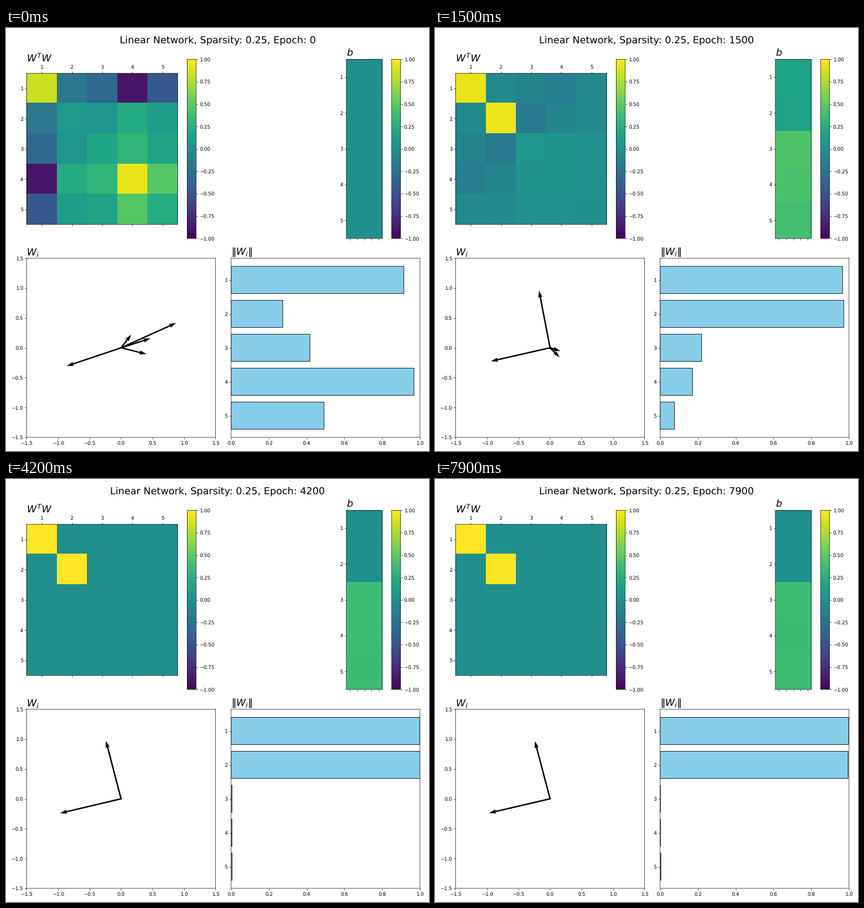
These frames come from a looping animation (748x748 px, 8000 ms). A matplotlib script:

```python
import numpy as np
import matplotlib.pyplot as plt
from matplotlib.animation import FuncAnimation

plt.rcParams.update({"path.snap": False, "text.hinting": "no_hinting"})

SIZE = 748
FRAMES, INTERVAL = 80, 100
FEATURES = np.arange(1, 6)
MEAN_X = 0.375  # expected value of one sparse input
MID, SETTLE = 7, 15  # in frames of 100 epochs
DECAY = 0.16

# Five weight vectors as complex numbers: three poses of the search phase
POSES = np.array([
    [-.862 - .306j, .162 + .221j, .404 - .106j, .874 + .416j, .466 + .157j],
    [-.847 - .146j, -.189 + .825j, .098 - .434j, .456 + .190j, .126 - .035j],
    [-.940 - .225j, -.175 + .957j, .152 - .159j, .163 - .054j, .070 - .030j],
])
# In the end two features stay, at right angles, and the rest vanish
FIRST = np.exp(-2.901j)
REST = np.array([FIRST, -1j * FIRST, 0, 0, 0])


def search(t):
    """Parabola through the three poses."""
    a, b, c = POSES
    s1 = (b - a) / MID
    s2 = (c - b) / (SETTLE - MID)
    return a + s1 * t + (s2 - s1) / SETTLE * t * (t - MID)


def converge(t):
    """Exponential approach to the final pose, with training noise."""
    rng = np.random.default_rng(t)
    noise = rng.normal(0, 0.003, 5) + 1j * rng.normal(0, 0.003, 5)
    return REST + (POSES[-1] - REST) * np.exp(-DECAY * (t - SETTLE)) + noise


def weights(t):
    return search(t) if t <= SETTLE else converge(t)


def bias(gram, epoch):
    """Best bias for the weights, reached at the optimiser's step limit."""
    limit = epoch * 0.001
    return np.clip(MEAN_X * (1 - gram.sum(axis=1)), -limit, limit)


fig = plt.figure(figsize=(12, 12), dpi=SIZE / 12)


def panel(x, y, w, h):
    """Axes from a box in pixels with the origin at the top left."""
    return fig.add_axes([x / SIZE, 1 - (y + h) / SIZE, w / SIZE, h / SIZE])


def heatmap(ax, data):
    im = ax.imshow(data, cmap="viridis", vmin=-1, vmax=1, aspect="auto")
    ax.set_yticks(range(5), FEATURES)
    return im


def heading(ax, text):
    ax.set_title(text, loc="left", fontsize=20)


LEFT, RIGHT, TOP, LOW = 36.45, 398, 55.3, 407.1
WIDTH, HEIGHT = 334, 316.8
MAP = 0.8 * WIDTH  # what the colour scale leaves of a cell
STRIP = HEIGHT / 5

title = fig.suptitle("", fontsize=20)

gram_ax = panel(LEFT, TOP + (HEIGHT - MAP) / 2, MAP, MAP)
gram_im = heatmap(gram_ax, np.zeros((5, 5)))
gram_ax.set_xticks(range(5), FEATURES)
gram_ax.tick_params(axis="x", top=True, bottom=True,
                    labeltop=True, labelbottom=False)
heading(gram_ax, "$W^TW$")

bias_ax = panel(RIGHT + MAP - STRIP, TOP, STRIP, HEIGHT)
bias_im = heatmap(bias_ax, np.zeros((5, 1)))
bias_ax.set_xticks(np.linspace(-0.4, 0.4, 5), [""] * 5)
heading(bias_ax, "$b$")

for im, x in ((gram_im, LEFT), (bias_im, RIGHT)):
    cax = panel(x + 0.85 * WIDTH, TOP, HEIGHT / 20, HEIGHT)
    fig.colorbar(im, cax=cax, ticks=np.arange(-1, 1.01, 0.25))

vec_ax = panel(LEFT, LOW, WIDTH, HEIGHT)
vec_ax.set(xlim=(-1.5, 1.5), ylim=(-1.5, 1.5))
arrows = vec_ax.quiver(np.zeros(5), np.zeros(5), POSES[0].real, POSES[0].imag,
                       color="black", angles="xy", scale_units="xy", scale=1)
heading(vec_ax, "$W_i$")

norm_ax = panel(RIGHT, LOW, WIDTH, HEIGHT)
bars = norm_ax.barh(FEATURES, np.zeros(5), color="skyblue", edgecolor="black")
norm_ax.set(xlim=(0, 1), ylim=(5.64, 0.36), yticks=FEATURES)
heading(norm_ax, r"$\|W_i\|$")


def update(frame):
    epoch = frame * 100
    w = weights(frame)
    gram = np.outer(w, w.conj()).real
    title.set_text(f"Linear Network, Sparsity: 0.25, Epoch: {epoch}")
    gram_im.set_data(gram)
    bias_im.set_data(bias(gram, epoch)[:, None])
    arrows.set_UVC(w.real, w.imag)
    for bar, length in zip(bars, abs(w)):
        bar.set_width(length)
    return []


anim = FuncAnimation(fig, update, frames=FRAMES, interval=INTERVAL,
                     init_func=lambda: update(0), repeat=True, repeat_delay=0)
plt.show()
```
